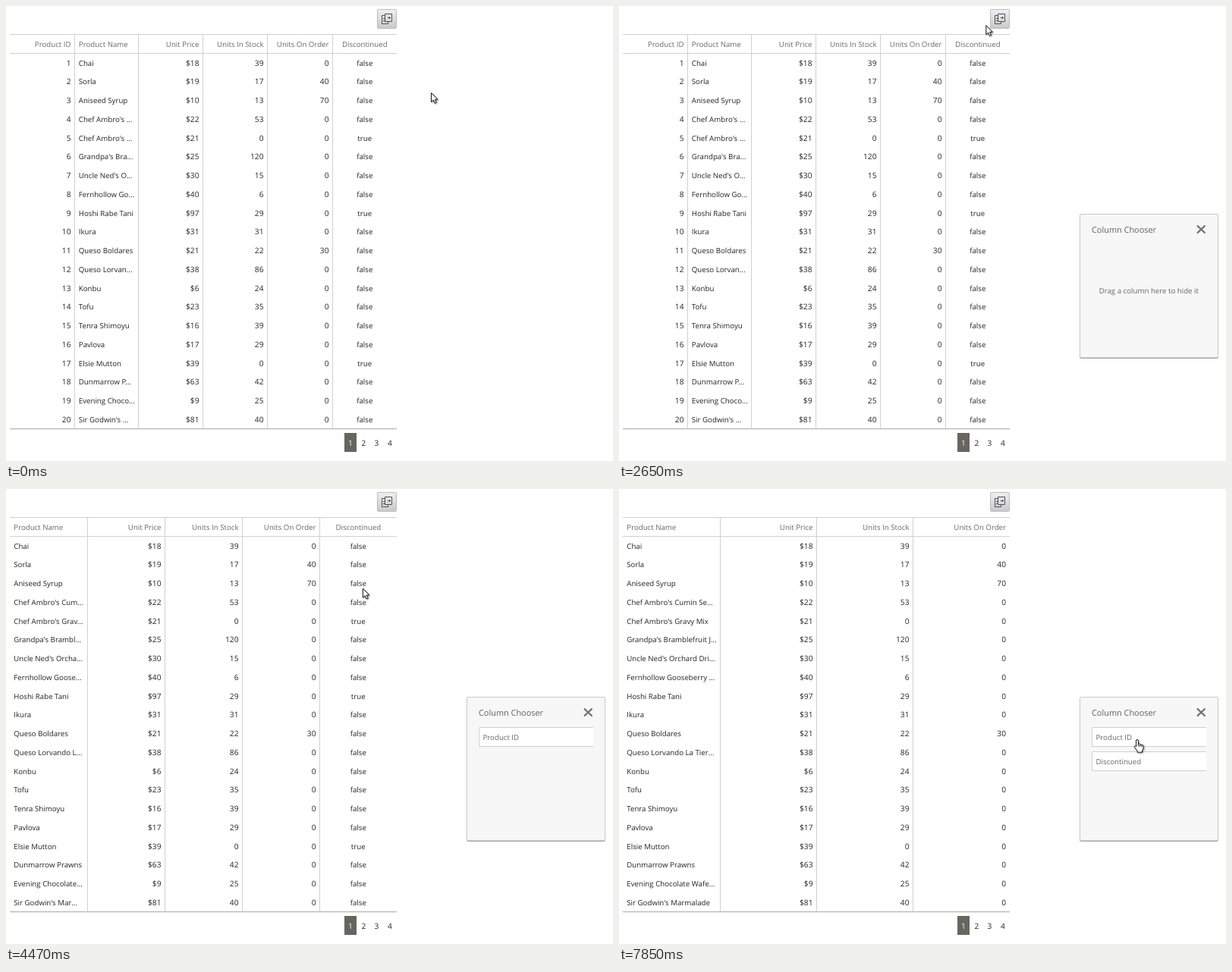
Animation, 800 px wide and 600 px high, one loop 8 s. Source, as an HTML page:

```html
<!DOCTYPE html>
<html lang="en">
<head>
<meta charset="utf-8">
<title>Column chooser</title>
<style>
html, body { margin: 0; height: 100%; overflow: hidden; background: #fff; }
svg { display: block; width: 800px; height: 600px; }
text { font: 9.7px "Open Sans", sans-serif; fill: #242424; text-rendering: geometricPrecision; }
.number { font-size: 10.2px; }
.head { fill: #686868; }
.title { font-size: 10.9px; fill: #606060; }
.ghost text { font: 11px "Liberation Serif", serif; fill: #000; }
.ghost rect { fill: #fff; stroke: #b4b4b4; filter: drop-shadow(0 1px 1px #0003); }
.item path { fill: #fff; stroke: #d0d0d0; }
.line { stroke: #d0d0d0; }
.panel { fill: #f7f7f7; stroke: #c8c8c8; filter: drop-shadow(0 1px .6px #0005); }
.cursor path { fill: #fff; stroke: #14141c; stroke-linejoin: round; }
.cursor { filter: drop-shadow(1.5px 1.5px 1px #0006); }
</style>
</head>
<body>
<svg id="stage" viewBox="0 0 800 600"></svg>
<script>
const LOOP = 8000, FIRST_DROP = 4230, SECOND_DROP = 6260, POPUP = 1597;

// name, price, stock, on order, discontinued
const rows = `Chai,18,39
Sorla,19,17,40
Aniseed Syrup,10,13,70
Chef Ambro's Cumin Seafood Rub,22,53
Chef Ambro's Gravy Mix,21,0,0,true
Grandpa's Bramblefruit Jelly,25,120
Uncle Ned's Orchard Dried Figs,30,15
Fernhollow Gooseberry Sauce,40,6
Hoshi Rabe Tani,97,29,0,true
Ikura,31,31
Queso Boldares,21,22,30
Queso Lorvando La Tierrina,38,86
Konbu,6,24
Tofu,23,35
Tenra Shimoyu,16,39
Pavlova,17,29
Elsie Mutton,39,0,0,true
Dunmarrow Prawns,63,42
Evening Chocolate Wafer Rolls,9,25
Sir Godwin's Marmalade,81,40`.split('\n').map(line => line.split(','));

const columns = [
  ['Product ID', 'end', (r, i) => i + 1],
  ['Product Name', 'start', r => r[0]],
  ['Unit Price', 'end', r => '$' + r[1]],
  ['Units In Stock', 'end', r => r[2]],
  ['Units On Order', 'end', r => r[3] || 0],
  ['Discontinued', 'middle', r => r[4] || 'false']
];

const layouts = [
  { first: 0, edges: [5, 90.5, 174.5, 259.5, 344.5, 430.5, 515] },
  { first: 1, edges: [5, 107.5, 209.5, 311.5, 413.5, 515] },
  { first: 1, edges: [5, 133.5, 260.5, 387.5, 515] }
];

// time, x, y of the pointer tip
const path = [
  [0, 560, 114], [390, 560, 114], [500, 542, 82], [650, 508, 30], [780, 500, 19],
  [2590, 500, 19], [2700, 470, 30], [2900, 260, 60], [3050, 110, 61], [3190, 66, 55],
  [3350, 66, 55], [3440, 78, 61], [3650, 330, 200], [3850, 640, 322], [3905, 700, 341],
  [3950, 701, 341], [4070, 705, 342], [4230, 705, 342], [4300, 650, 300], [4470, 470, 131],
  [4650, 452, 80], [4950, 450, 58], [5110, 450, 58], [5210, 462, 67], [5350, 510, 170],
  [5460, 597, 317], [5500, 681, 396], [5600, 694, 402], [5800, 697, 403], [7550, 697, 403],
  [7700, 690, 365], [7850, 683, 331], [LOOP, 683, 331]
];

const drags = [
  { from: 3480, to: FIRST_DROP, dx: 62, dy: 24, column: 'c0-0' },
  { from: 5250, to: SECOND_DROP, dx: 36, dy: 20, column: 'c1-5' }
];

const ruler = document.createElement('canvas').getContext('2d');
ruler.textRendering = 'geometricPrecision';
ruler.font = '9.7px "Open Sans", sans-serif';

function fit(text, width) {
  const measure = s => ruler.measureText(s).width;
  if (measure(text) <= width) return text;
  while (measure(text + '...') > width) text = text.slice(0, -1);
  return text + '...';
}

// y is the middle of the line
const label = (x, y, text, anchor = 'start', cls = '') =>
  `<text x="${x}" y="${y + 3.5}" text-anchor="${anchor}" class="${cls}" xml:space="preserve">${text}</text>`;
const line = (x1, y1, x2, y2) => `<path class="line" d="M${x1} ${y1}L${x2} ${y2}"/>`;

function table({ first, edges }, n) {
  let out = '';
  for (let k = 0; k < edges.length - 1; k++) {
    const [left, right] = [edges[k], edges[k + 1]];
    const [title, anchor, value] = columns[first + k];
    const x = { start: left + 5.3, end: right - 5, middle: (left + right) / 2 }[anchor];
    const cls = anchor === 'end' ? 'number' : '';
    const cells = rows.map((r, i) =>
      label(x, 75 + 24.75 * i, fit(String(value(r, i)), right - left - 10), anchor, cls));
    out += `<g id="c${n}-${first + k}">${label(x, 50.3, title, anchor, 'head')}${cells.join('')}</g>`;
    if (k) out += line(left, 38, left, 557);
  }
  return `<g id="table${n}">${out}</g>`;
}

const item = (id, y, text) => `<g id="${id}" class="item">
  <path d="M774 ${y}H623.5V${y + 25}H774"/>${label(628.5, y + 12.7, text, 'start', 'head')}</g>`;

const ghost = (n, width, x, anchor, text) => `<g id="ghost${n}" class="ghost">
  <rect x=".5" y=".5" width="${width}" height="25"/>${label(x, 13.4, text, anchor)}</g>`;

const stage = document.getElementById('stage');
stage.innerHTML = `
<defs>
  <linearGradient id="idle" x2="0" y2="1"><stop stop-color="#f0f0f0"/><stop offset="1" stop-color="#c9c9c9"/></linearGradient>
  <linearGradient id="hover" x2="0" y2="1"><stop stop-color="#fcfcfc"/><stop offset="1" stop-color="#e6e6e6"/></linearGradient>
</defs>
<rect id="button" x="489.5" y="4.5" width="25" height="25" rx="1.5"/>
<g fill="none" stroke="#50505a">
  <path d="M499.5 12.5H495.5V23.5H503.5V20.5M497 16.5H499M497 19.5H499"/>
  <path d="M499.5 10.5H508.5V20.5H499.5ZM503 15.5H507M505.5 14V17"/>
</g>
${layouts.map(table).join('')}
${line(5, 37.5, 515, 37.5)}${line(5, 62.5, 515, 62.5)}
<path d="M5 557.5H515" stroke="#bdbdbd" stroke-width="1.4"/>
<rect x="446" y="563" width="16" height="25" fill="#66665f"/>
<g id="pager">${[454, 471.5, 488.5, 506].map((x, i) => label(x, 576, i + 1, 'middle', 'number')).join('')}</g>
<g id="chooser">
  <rect class="panel" x="607.5" y="274.5" width="182" height="189" rx="1.5"/>
  ${label(623, 295, 'Column Chooser', 'start', 'title')}
  <path d="M762 289.5L772.5 299.5M772.5 289.5L762 299.5" stroke="#707070" stroke-width="2.3"/>
  <g id="hint">${label(698.3, 375.3, 'Drag a column here to hide it', 'middle', 'head')}</g>
  ${item('item0', 314.5, 'Product ID')}${item('item1', 346.5, 'Discontinued')}
</g>
${ghost(0, 86, 80.5, 'end', 'Product ID')}${ghost(1, 102, 51.5, 'middle', 'Discontinued')}
<g id="cursor" class="cursor">
  <path id="arrow" d="M.5 .5V12.6L3.3 10L5.2 14.3L7.2 13.4L5.3 9.2H9Z"/>
  <path id="hand" d="M-1.4 9V1Q-1.4-.5 0-.5T1.4 1V5.3Q2.6 4.5 3.6 5.8Q4.8 5.1 5.8 6.5Q8 6 8 8.2V11.5L6.6 14V16.2H.2V14.3L-3.6 9.6Q-4.2 7.6-2.6 7.8ZM1.4 5.3V8.5M3.6 5.8V8.7M5.8 6.5V9"/>
</g>`;
const el = id => document.getElementById(id);
const show = (id, on) => { el(id).style.display = on ? '' : 'none'; };
const place = (id, x, y) => el(id).setAttribute('transform', `translate(${x} ${y})`);
el('pager').firstChild.style.fill = '#f4f4f4';

function pointer(t) {
  const i = Math.max(1, path.findIndex(key => key[0] > t));
  const [a, b] = [path[i - 1], path[i]];
  const u = (t - a[0]) / (b[0] - a[0]);
  return [a[1] + (b[1] - a[1]) * u, a[2] + (b[2] - a[2]) * u];
}

// cubic-bezier(.25, .1, .25, 1)
function ease(x) {
  let lo = 0, hi = 1, s;
  for (let i = 0; i < 20; i++) {
    s = (lo + hi) / 2;
    if (.75 * s - .75 * s * s + s ** 3 < x) lo = s; else hi = s;
  }
  return .3 * s * (1 - s) ** 2 + 3 * s * s * (1 - s) + s ** 3;
}

function draw(t) {
  const [x, y] = pointer(t);
  const within = (x1, y1, x2, y2) => x >= x1 && x <= x2 && y >= y1 && y <= y2;
  const phase = t < FIRST_DROP ? 0 : t < SECOND_DROP ? 1 : 2;
  layouts.forEach((_, n) => show('table' + n, n === phase));

  const overButton = within(489, 4, 515, 30);
  el('button').setAttribute('fill', overButton ? 'url(#hover)' : 'url(#idle)');
  el('button').setAttribute('stroke', overButton ? '#d8d8d8' : '#bcbcbc');

  const pop = t >= 1930 ? 1 : ease(Math.max(0, t - POPUP) / 400);
  const scale = .55 + .45 * pop;
  show('chooser', t >= POPUP);
  el('chooser').setAttribute('opacity', Math.sqrt(pop));
  el('chooser').setAttribute('transform',
    `translate(698.5 369.5) scale(${scale}) translate(-698.5 -369.5)`);
  show('hint', phase === 0);
  show('item0', phase > 0);
  show('item1', phase > 1);

  let dragging = false;
  drags.forEach((d, n) => {
    const on = t >= d.from && t < d.to;
    const [gx, gy] = pointer(Math.max(0, t - 40));
    dragging ||= on;
    show('ghost' + n, on);
    place('ghost' + n, Math.round(gx - d.dx), Math.round(gy - d.dy));
    el(d.column).setAttribute('opacity', on ? .5 : 1);
  });

  const overItem = phase > 0 && within(623, 314, 774, 340) || phase > 1 && within(623, 346, 774, 372);
  const hand = dragging || overButton || overItem || within(5, 38, 515, 62);
  show('hand', hand);
  show('arrow', !hand);
  place('cursor', x, y);
}

function tick() {
  draw(performance.now() % LOOP);
  requestAnimationFrame(tick);
}
tick();
</script>
</body>
</html>
```
